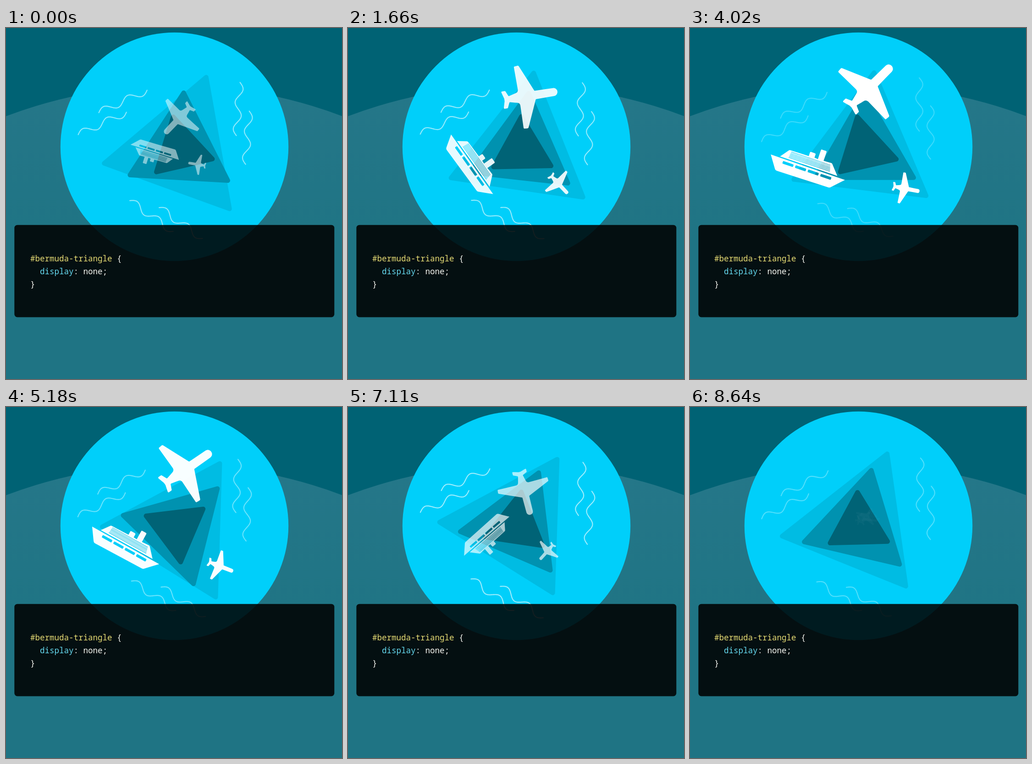
An HTML page with a canvas for the animation above (8.74 s loop, 733 px wide and 764 px high).

```html
<!DOCTYPE html>
<html lang="en">
<head>
<meta charset="utf-8">
<title>Bermuda triangle</title>
<style>
  html, body { margin: 0; width: 100%; height: 100%; overflow: hidden; background: #006274; }
  canvas { position: absolute; left: 0; top: 0; display: block; }
  pre {
    position: absolute; left: 53px; top: 487px; margin: 0;
    font: 500 17.5px/28px "Roboto Mono", "Noto Sans Mono", monospace;
    color: #f8f8f2;
  }
  .id { color: #e6db74; }
  .prop { color: #66d9ef; }
</style>
</head>
<body>
<canvas id="stage" width="733" height="764"></canvas>
<pre><span class="id">#bermuda-triangle</span> {
  <span class="prop">display</span>: none;
}</pre>
<script>
const ctx = document.getElementById('stage').getContext('2d');
const LOOP = 8740;
const PEAK = 3805;        // vehicles fully out, waves at their faintest
const FLIGHT = 4887;
const SWAY = 2900;
const LAG = 270;          // each larger triangle follows the smaller one
const RAD = Math.PI / 180;

const clamp = x => Math.max(0, Math.min(1, x));
const smooth = x => x * x * (3 - 2 * x);

// Closed polygon of [x, y, cornerRadius]
function polygon(path, pts) {
  const n = pts.length, last = pts[n - 1];
  path.moveTo((last[0] + pts[0][0]) / 2, (last[1] + pts[0][1]) / 2);
  pts.forEach((p, i) => {
    const q = pts[(i + 1) % n];
    path.arcTo(p[0], p[1], q[0], q[1], p[2] || 0);
    path.lineTo((p[0] + q[0]) / 2, (p[1] + q[1]) / 2);
  });
  path.closePath();
}

// Half an outline, nose to tail, mirrored on the axis
function makePlane() {
  const side = [
    [81, 9.3, 9], [28, 10, 2], [0, 74.5, 3], [-11, 73.5, 2],
    [-10, 13, 8], [-34, 7, 2], [-40, 20.5, 2], [-50, 20.5, 2], [-45, 3, 2]
  ];
  const mirror = side.map(([x, y, r]) => [x, -y, r]).reverse();
  const path = new Path2D();
  polygon(path, side.concat(mirror));
  return path;
}

function makeShip() {
  const path = new Path2D();
  const funnel = (x, h) => [[x, -24], [x, -h, 2], [x + 13, -h, 2], [x + 13, -24.5]];
  polygon(path, [[-85.5, -0.5], [85.5, 0], [59, 27, 6], [-65, 29, 6]]);
  polygon(path, [[-65, -3], [-50, -23, 4], ...funnel(-6, 34), ...funnel(15, 46.5), [47, -25.5, 4], [67, -3]]);
  for (let i = 0; i < 4; i++) path.roundRect(-55.5 + i * 29, 4, 24.5, 6, 1.5);
  for (let i = 0; i < 6; i++) path.rect(-45 - i * 0.3, -21 + i * 2.7, 90 + i, 1);
  return path;
}

function makeTriangle(r) {
  const path = new Path2D();
  polygon(path, [-90, 30, 150].map(a => [r * Math.cos(a * RAD), r * Math.sin(a * RAD), 5]));
  return path;
}

function makeWave() {
  const path = new Path2D();
  for (let x = 0; x <= 116; x++) path.lineTo(x, -7.7 * Math.sin(x / 29 * Math.PI));
  return path;
}

const plane = makePlane(), ship = makeShip(), wave = makeWave();

const craft = [
  { shape: plane, from: [382.5, 244.5], to: [382.5, 139.5], angle: -45, size: 1, shift: 0 },
  { shape: plane, from: [365.5, 243.5], to: [469.5, 349.5], angle: 11, size: 0.46, shift: -12 },
  { shape: ship, from: [393, 237], to: [257, 303.3], angle: 18.7, size: 1, shift: 0 }
];

// largest first
const triangles = [
  { shape: makeTriangle(178), tilt: 7, fill: '#00bce3' },
  { shape: makeTriangle(133.5), tilt: 0, fill: '#0092b0' },
  { shape: makeTriangle(82.5), tilt: -13, fill: '#006376' }
];

// Settle, sway once, swing round, then drift slowly back
function turn(t) {
  const settle = (Math.min(0, t) / 150) ** 2;
  const sway = 14 * Math.sin(Math.PI * clamp((t - 930) / 1950)) ** 2;
  const swing = 145 * smooth(clamp((t - 3958) / 2600));
  const drift = 0.0065 * Math.max(0, t - 6558);
  return settle + sway + swing - drift;
}

function disc(x, y, r, fill) {
  ctx.fillStyle = fill;
  ctx.beginPath();
  ctx.arc(x, y, r, 0, 2 * Math.PI);
  ctx.fill();
}

const ground = ctx.createLinearGradient(0, 125, 0, 480);
ground.addColorStop(0, '#257789');
ground.addColorStop(1, '#1f7484');

function drawTriangles(t) {
  triangles.forEach((tri, i) => {
    ctx.save();
    ctx.translate(375.5, 258);
    ctx.rotate(turn(t - LAG * (2 - i)) * RAD);
    ctx.translate(5.5, 6);
    ctx.rotate(tri.tilt * RAD);
    ctx.fillStyle = tri.fill;
    ctx.fill(tri.shape);
    ctx.restore();
  });
}

// Two parallel waves, the second one shifted along
function wavePair(x, y, angle) {
  ctx.save();
  ctx.translate(x, y);
  ctx.rotate(angle * RAD);
  ctx.stroke(wave);
  ctx.translate(61, -24.5);
  ctx.stroke(wave);
  ctx.restore();
}

function drawWaves(t) {
  const phase = Math.abs(t - PEAK) / SWAY % 2;
  const u = phase > 1 ? 2 - phase : phase;
  const w = u < 0.5 ? 2 * u * u : 1 - 2 * (1 - u) * (1 - u);
  ctx.save();
  ctx.translate(367.5, 258.5);
  ctx.rotate(-5.2 * (1 - w) * RAD);
  ctx.translate(-367.5, -258.5);
  ctx.strokeStyle = `rgba(255,255,255,${0.23 + 0.4 * w})`;
  ctx.lineWidth = 2.2;
  ctx.lineCap = 'round';
  wavePair(158, 228.5, -23.9);
  wavePair(513, 121, 95);
  wavePair(268, 374, 36.3);
  ctx.restore();
}

function drawCraft(t) {
  const back = clamp(Math.abs(t - PEAK) / FLIGHT) ** 2.8;
  const mix = (a, b) => b + (a - b) * back;
  ctx.fillStyle = '#fff';
  for (const c of craft) {
    const scale = c.size * mix(0.29, 1);
    ctx.save();
    ctx.globalAlpha = 1 - back;
    ctx.translate(mix(c.from[0], c.to[0]), mix(c.from[1], c.to[1]));
    ctx.rotate((c.angle + 360 * back) * RAD);
    ctx.scale(scale, scale);
    ctx.translate(c.shift, 0);
    ctx.fill(c.shape, 'evenodd');
    ctx.restore();
  }
}

function draw(now) {
  const t = now % LOOP;
  ctx.fillStyle = '#006274';
  ctx.fillRect(0, 0, 733, 764);
  disc(367, 1163.6, 1038.6, ground);
  disc(367.5, 258.5, 248.7, '#00cffa');
  drawTriangles(t);
  drawWaves(t);
  drawCraft(t);
  ctx.fillStyle = 'rgba(0,0,0,0.87)';
  ctx.beginPath();
  ctx.roundRect(18.3, 428.7, 698, 200.8, 6.5);
  ctx.fill();
  requestAnimationFrame(draw);
}

requestAnimationFrame(draw);
</script>
</body>
</html>
```
